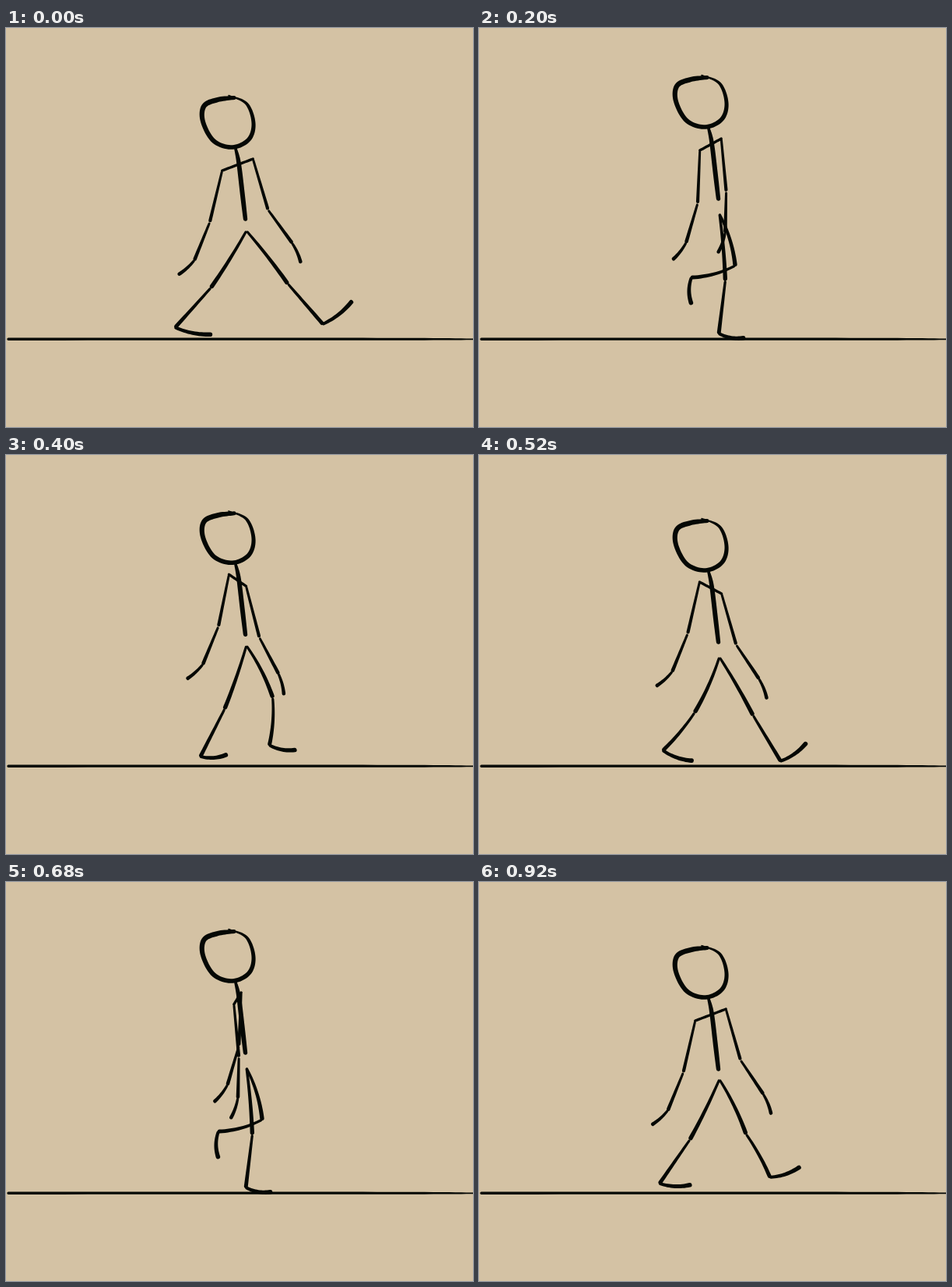
These frames come from a looping animation (600x512 px, 0.96 s). An HTML page with a canvas:

```html
<!DOCTYPE html>
<html lang="en">
<head>
<meta charset="utf-8">
<title>Walk cycle</title>
<style>
  html, body { margin: 0; width: 100%; height: 100%; overflow: hidden; background: #d4c2a4; }
  canvas { display: block; width: 600px; height: 512px; }
</style>
</head>
<body>
<canvas id="stage" width="600" height="512"></canvas>
<script>
const ctx = document.getElementById('stage').getContext('2d');
const PAPER = '#d4c2a4', INK = '#050805';
const STEPS = 24, HALF = STEPS / 2, STEP_MS = 40;

// Leg keys: step, then angles in degrees of thigh and shin (from straight down) and foot (from level)
const STRIDE = [
  [0, 38, 41, -38], [1, 30, 31, -35], [5, 5, -7, 10], [7, -11, -16, -6],
  [10, -19, -27, -4], [12, -32, -42, 11], [13, -24, -40, 19], [17, 17, -75, 90],
  [19, 20, -32, 34], [22, 27, -4, 10], [23, 26, 29, -19]
];

// Outlines as x, y, brush width
const HEAD = [
  [293, 89.5, 5], [272, 92, 6.4], [254.5, 100, 6.4], [253, 120, 6], [267, 145, 5.8],
  [291, 153, 5.6], [312, 143, 5.6], [318, 122, 5], [309, 97, 3.8], [286, 86.5, 1.4]
];
const TORSO = [[295, 155, 3.6], [299, 173, 5.6], [304, 215, 6], [307.5, 245, 5.4]];
const GROUND = [[3, 399.2, 3.4], [300, 399.2, 3.2], [510, 399.2, 3], [602, 399.4, 1.8]];

function hermite(a, b, slopeA, slopeB, span, u) {
  const u2 = u * u, u3 = u2 * u;
  return a * (2 * u3 - 3 * u2 + 1) + b * (3 * u2 - 2 * u3) +
    span * (slopeA * (u3 - 2 * u2 + u) + slopeB * (u3 - u2));
}

// Smooth cyclic interpolation of the leg keys
function strideAt(step) {
  const n = STRIDE.length;
  const key = i => STRIDE[(i + n) % n];
  const time = i => key(i)[0] + STEPS * Math.floor(i / n);
  let i = n - 1;
  while (STRIDE[i][0] > step) i--;
  const span = time(i + 1) - time(i);
  const slope = (j, c) => (key(j + 1)[c] - key(j - 1)[c]) / (time(j + 1) - time(j - 1));
  return [1, 2, 3].map(c =>
    hermite(key(i)[c], key(i + 1)[c], slope(i, c), slope(i + 1, c), span, (step - time(i)) / span));
}

// Pendulum motion with a second harmonic
function swing(step, mean, first, second) {
  const a = step / STEPS * 2 * Math.PI;
  return mean + first * Math.cos(a) + second * Math.cos(2 * a);
}

function bodyBob(step) {
  const a = step / HALF * 2 * Math.PI;
  return -17.4 + 10.7 * Math.cos(a + 0.334) + 7.57 * Math.cos(2 * a - 0.267);
}

// Fills a line of varying width with round ends
function brush(line) {
  const last = line.length - 1;
  const angles = line.map((p, i) => {
    const a = line[Math.max(0, i - 1)], b = line[Math.min(last, i + 1)];
    return Math.atan2(b[1] - a[1], b[0] - a[0]);
  });
  const edge = (i, side) => {
    const [x, y, w] = line[i], a = angles[i] + side * Math.PI / 2;
    ctx.lineTo(x + Math.cos(a) * w / 2, y + Math.sin(a) * w / 2);
  };
  const cap = (i, turn) => {
    const [x, y, w] = line[i], a = angles[i] + turn;
    ctx.arc(x, y, w / 2, a, a + Math.PI);
  };
  ctx.beginPath();
  for (let i = 0; i <= last; i++) edge(i, -1);
  cap(last, -Math.PI / 2);
  for (let i = last; i >= 0; i--) edge(i, 1);
  cap(0, Math.PI / 2);
  ctx.fill();
}

function smooth(points, detail = 10) {
  const at = i => points[Math.max(0, Math.min(points.length - 1, i))];
  const line = [];
  for (let i = 0; i < points.length - 1; i++) {
    for (let k = 0; k < detail; k++) {
      line.push([0, 1, 2].map(c => hermite(at(i)[c], at(i + 1)[c],
        (at(i + 1)[c] - at(i - 1)[c]) / 2, (at(i + 2)[c] - at(i)[c]) / 2, 1, k / detail)));
    }
  }
  line.push(at(points.length - 1));
  return line;
}

// One stroke between two joints, leaving a small gap at each end
function limb([x0, y0], [x1, y1], { bend = 0, from = 3.2, to = 5, gap = 2 } = {}) {
  const dx = x1 - x0, dy = y1 - y0, length = Math.hypot(dx, dy);
  const inset = gap / length, line = [];
  for (let k = 0; k <= 16; k++) {
    const u = k / 16, v = inset + (1 - 2 * inset) * u, bow = 4 * u * (1 - u) * bend / length;
    line.push([x0 + dx * v - dy * bow, y0 + dy * v + dx * bow, from + (to - from) * u]);
  }
  brush(line);
}

// Joint reached from another one, with the angle taken from straight down
function reach([x, y], length, degrees) {
  const a = degrees * Math.PI / 180;
  return [x + length * Math.sin(a), y + length * Math.cos(a)];
}

function drawLeg(step) {
  const [thigh, shin, foot] = strideAt(step);
  const a = step / HALF * Math.PI;
  const lifted = Math.sqrt(Math.max(0, -Math.sin(a)));
  const hip = [309, 238 + 23 * Math.cos(a - 0.105) ** 6];
  const knee = reach(hip, 86 - 16 * lifted, thigh);
  const ankle = reach(knee, 69 - 10 * lifted, shin);
  const toe = reach(ankle, 33 + 14 * Math.cos(a) ** 20, 90 - foot);
  limb(hip, knee, { bend: -1 - 2 * lifted, to: 5.4 });
  limb(knee, ankle, { bend: -3 * lifted });
  limb(ankle, toe, { bend: 2.5, from: 4, to: 5.6, gap: 1 });
}

function drawArm(step, shoulder) {
  const elbow = reach(shoulder, 68, swing(step, 1.5, -15, 0));
  const wrist = reach(elbow, 53, swing(step, -1.5, -29, 8.5));
  const fingers = reach(wrist, 27, swing(step, -21, -36, 9));
  limb(shoulder, elbow, { from: 3, to: 4.2 });
  limb(elbow, wrist, { from: 3, to: 4.6 });
  limb(wrist, fingers, { bend: -1, from: 3.2, to: 4.6, gap: 1 });
}

const headLine = smooth(HEAD), torsoLine = smooth(TORSO), groundLine = smooth(GROUND);

function draw(step) {
  const opposite = (step + HALF) % STEPS;
  ctx.fillStyle = PAPER;
  ctx.fillRect(0, 0, 600, 512);
  ctx.fillStyle = INK;
  brush(groundLine);
  drawLeg(step);
  drawLeg(opposite);

  const spread = swing(step, 6, 17.5, -3.7);
  const near = [297.5 - spread, 183], far = [297.5 + spread, 168];
  ctx.save();
  ctx.translate(0, bodyBob(step));
  brush(headLine);
  brush(torsoLine);
  limb(near, far, { from: 3.4, to: 3.4, gap: 0 });
  drawArm(step, near);
  drawArm(opposite, far);
  ctx.restore();
}

function tick() {
  draw(Math.floor(performance.now() / STEP_MS) % STEPS);
  requestAnimationFrame(tick);
}
tick();
</script>
</body>
</html>
```
